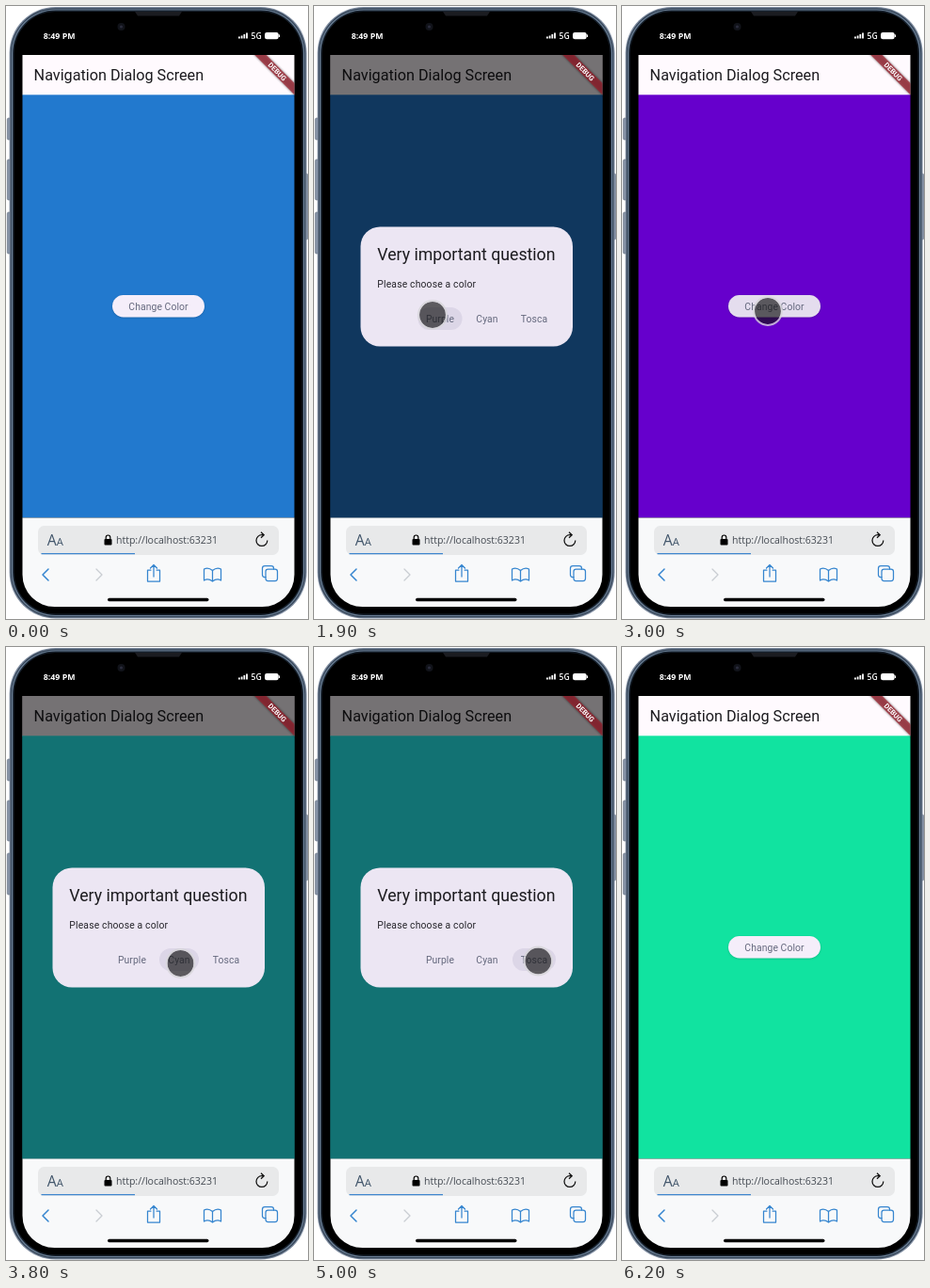
These frames come from a looping animation (321x651 px, 6.3 s). An HTML page:

```html
<!DOCTYPE html>
<html lang="en">
<head>
<meta charset="utf-8">
<title>Navigation Dialog Screen</title>
<style>
html, body { margin: 0; width: 100%; height: 100%; overflow: hidden; background: #fff; }
svg { display: block; width: 321px; height: 651px; }
text { font-family: Roboto, sans-serif; white-space: pre; }
.label { font-size: 10.34px; letter-spacing: .1px; fill: #64687d; }
.sys { font-family: "Open Sans", "Noto Sans", sans-serif; }
.icon { fill: none; stroke: #3585cf; stroke-width: 1.25; stroke-linecap: round; stroke-linejoin: round; }
.hover { fill: #54457f; fill-opacity: .1; }
</style>
</head>
<body>
<svg viewBox="0 0 321 651">
  <defs>
    <clipPath id="page"><rect x="17.5" y="52" width="289" height="491.5"/></clipPath>
    <clipPath id="pill"><rect x="113" y="307" width="98" height="23.5" rx="11.75"/></clipPath>
    <filter id="soft" x="-20%" y="-60%" width="140%" height="220%"><feGaussianBlur stdDeviation="1.2"/></filter>
  </defs>

  <!-- phone body -->
  <g fill="#8793a6" stroke="#5b687b" stroke-width=".6">
    <rect x="1.3" y="119" width="5" height="23" rx="1.5"/>
    <rect x="1.3" y="163" width="5" height="43" rx="1.5"/>
    <rect x="1.3" y="219" width="5" height="44" rx="1.5"/>
    <rect x="316" y="178" width="4.7" height="70" rx="1.5"/>
  </g>
  <rect x="3.6" y="1" width="316" height="649.5" rx="49" fill="#7b899d"/>
  <rect x="4.8" y="2.2" width="313.6" height="647.1" rx="47.8" fill="#334254"/>
  <rect x="6" y="3.4" width="311.2" height="644.7" rx="46.6" fill="#6c8097"/>
  <rect x="7.2" y="4.6" width="308.8" height="642.3" rx="45.4" fill="#17212d"/>
  <rect x="8.6" y="6" width="306" height="639.5" rx="44"/>
  <path d="M137 6H187L184 10.5H140Z" fill="#1b1c21"/>
  <circle cx="122.5" cy="22" r="4" fill="#11131a"/>
  <circle cx="122.5" cy="22" r="1.6" fill="#2a2c3c"/>

  <!-- status bar -->
  <g fill="#fff">
    <text class="sys" x="39.8" y="34.5" font-size="8.8" font-weight="700">8:49 PM</text>
    <path d="M247 32.5h1.8v2h-1.8zM249.7 31.5h1.8v3h-1.8zM252.4 30h1.8v4.500h-1.8zM255.1 28.5h1.8v6h-1.8z"/>
    <text class="sys" x="260.5" y="34.7" font-size="8.6" font-weight="600">5G</text>
    <rect x="275" y="28" width="14.7" height="7.2" rx="2.2"/>
    <rect x="290" y="30.2" width="1.100" height="2.8" rx=".5"/>
  </g>

  <!-- app -->
  <g clip-path="url(#page)">
    <rect id="back" x="17" y="94" width="290" height="450"/>
    <rect x="17" y="52" width="290" height="42.3" fill="#fffafe"/>
    <text x="29.6" y="78.7" font-size="16.2" fill="#1c1b1f">Navigation Dialog Screen</text>
    <rect x="113" y="307.8" width="98" height="23.5" rx="11.75" opacity=".18" filter="url(#soft)"/>
    <rect x="113" y="307" width="98" height="23.5" rx="11.75" fill="#f5eefa"/>
    <g clip-path="url(#pill)">
      <rect id="press" class="hover" x="113" y="307" width="98" height="24"/>
      <circle id="splash" class="hover"/>
    </g>
    <text class="label" x="162" y="322.5" text-anchor="middle">Change Color</text>

    <rect id="shade" x="17" y="52" width="290" height="492"/>
    <g id="dialog">
      <rect x="49.5" y="234.5" width="225.5" height="127" rx="20.7" fill="#ece6f3"/>
      <text x="67.3" y="269.8" font-size="17.72" fill="#1c1b1f">Very important question</text>
      <text x="67.3" y="299" font-size="10.34" letter-spacing=".18" fill="#25242a">Please choose a color</text>
      <g id="chips"></g>
    </g>

    <g transform="translate(306 52) rotate(45) scale(.7385)">
      <rect x="-60" y="28" width="120" height="12" opacity=".5" filter="url(#soft)"/>
      <rect x="-60" y="28" width="120" height="12" fill="#a31c2c" fill-opacity=".68"/>
      <text x="0" y="37.5" font-size="10.2" font-weight="700" fill="#fff" text-anchor="middle">DEBUG</text>
    </g>
    <g id="cursor">
      <circle r="14" fill="#111" fill-opacity=".65"/>
      <circle r="14.9" fill="none" stroke="#d8d6da" stroke-opacity=".8" stroke-width="2"/>
    </g>
  </g>

  <!-- browser bar -->
  <path d="M17.5 543.5H306.5V604A34 34 0 0 1 272.5 638H51.5A34 34 0 0 1 17.5 604Z" fill="#f8f9fa"/>
  <rect x="34" y="552" width="256" height="31" rx="6.5" fill="#e8e9ea"/>
  <path d="M37.5 581.7H137" stroke="#3f86cf" stroke-width="1.3"/>
  <g fill="#42566b">
    <text class="sys" x="43.8" y="573.2" font-size="15.8">A</text>
    <text class="sys" x="53.8" y="573.2" font-size="11.3">A</text>
  </g>
  <rect x="104.5" y="566" width="8" height="6.5" rx="1"/>
  <path d="M106.2 566v-1.7a2.3 2.3 0 0 1 4.6 0v1.7" fill="none" stroke="#000" stroke-width="1.2"/>
  <text class="sys" x="117" y="571" font-size="10.54" fill="#444a52">http://localhost:63231</text>
  <path d="M277.8 567.6A5.9 5.9 0 1 1 272 561.7H274M271 558.7L274.2 561.7L271 564.7" fill="none" stroke="#111" stroke-width="1.25"/>
  <g class="icon">
    <path d="M45 598L39 604L45 610" stroke-width="1.5"/>
    <path d="M96 598L102 604L96 610" stroke="#c9cdd2"/>
    <path d="M154 599H150.5V611H163.5V599H160M157 606V593.5M153.5 597L157 593.5L160.5 597"/>
    <path d="M219.500 599.5Q215 595.5 210.5 598V610Q215 607.5 219.5 611Q224 607.5 228.5 610V598Q224 595.5 219.5 599.5V611"/>
    <rect x="276" y="598" width="12.5" height="12.5" rx="2.5"/>
    <path d="M276 606.5H275A2.5 2.5 0 0 1 272.5 604V597A2.5 2.5 0 0 1 275 594.5H282A2.5 2.5 0 0 1 284.5 597V598"/>
  </g>
  <rect x="108" y="628.8" width="107.5" height="3.4" rx="1.7"/>
</svg>

<script>
const $ = id => document.getElementById(id);
const set = (el, attrs) => { for (const k in attrs) el.setAttribute(k, attrs[k]); };

const LOOP = 6300, STEP = 100;
const colors = [[0, '#2279ce'], [2000, '#6600cc'], [3800, '#28fafc'], [5200, '#11e3a0']];
const dialogs = [[1200, 2000], [3200, 3800], [4500, 5200]];   // opened, answered
const path = [                                                // time, x, y
  [200, 325, 450], [900, 165, 319], [1200, 165, 319], [1800, 126, 328],
  [2100, 126, 328], [2900, 155, 324], [3200, 155, 324], [3600, 185.5, 336],
  [4200, 185.5, 336], [4400, 185, 318], [4500, 185, 318], [4900, 238.3, 333.5],
  [5600, 238.3, 333.5], [6200, 325, 450]
];
const options = [['Purple', 110.5, 47], ['Cyan', 163, 42], ['Tosca', 211, 46]];

$('chips').innerHTML = options.map(([name, x, w]) =>
  `<rect class="hover" x="${x}" y="320" width="${w}" height="24" rx="12"/>
   <text class="label" x="${x + w / 2}" y="335.7" text-anchor="middle">${name}</text>`).join('');
const chips = [...$('chips').querySelectorAll('rect')];

function cursorAt(t) {
  const i = path.findIndex(p => p[0] > t);
  if (i < 1) return [-50, -50];
  const [a, b] = [path[i - 1], path[i]];
  const u = (t - a[0]) / (b[0] - a[0]), e = u * u * (3 - 2 * u);
  return [a[1] + (b[1] - a[1]) * e, a[2] + (b[2] - a[2]) * e];
}

function openness(t) {
  for (const [start, end] of dialogs) {
    if (t < start || t >= end + 200) continue;
    if (t > end) return .42;
    return t < start + 100 ? .33 : t < start + 200 ? .93 : 1;
  }
  return 0;
}

function draw(t) {
  const [x, y] = cursorAt(t), open = openness(t);
  const inside = (l, top, w, h) => x >= l && x <= l + w && y >= top && y <= top + h;
  const show = on => ({ visibility: on ? 'visible' : 'hidden' });

  set($('back'), { fill: colors.filter(c => c[0] <= t).pop()[1] });
  set($('shade'), { opacity: .54 * open });
  set($('dialog'), { opacity: open });
  set($('cursor'), { transform: `translate(${x} ${y})` });
  set($('press'), show(open < .9 && inside(113, 307, 98, 23.5)));

  const click = dialogs.find(([s]) => t >= s - 100 && t <= s + 100);
  set($('splash'), { cx: x, cy: y, r: click ? (t - click[0] + 200) * .19 : 0 });
  chips.forEach((chip, i) => set(chip, show(open > .4 && inside(options[i][1], 320, options[i][2], 24))));
}

const begin = performance.now();
function tick() {
  const t = (performance.now() - begin) % LOOP;
  draw(Math.floor(t / STEP) * STEP);
  requestAnimationFrame(tick);
}
tick();
</script>
</body>
</html>
```
